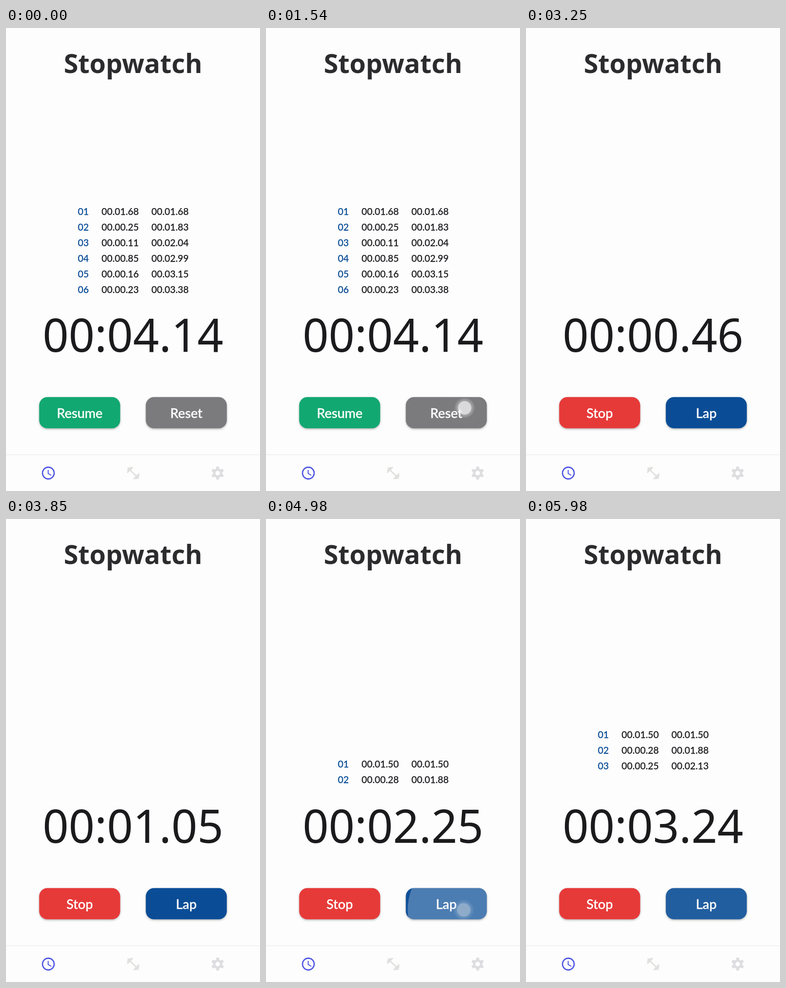
These frames come from a looping animation (555x1008 px, 6 s). An HTML page:

```html
<!DOCTYPE html>
<html lang="en">
<head>
<meta charset="utf-8">
<title>Stopwatch</title>
<style>
  html, body { margin: 0; width: 100%; height: 100%; overflow: hidden; background: #fdfdfd; }
  svg { display: block; width: 100%; height: 100%; }
  text { text-anchor: middle; }
  .title { font: 700 57.3px "Noto Sans", "Open Sans", sans-serif; fill: #2c2c2e; }
  .timer { font: 400 99.6px "Noto Sans", "Open Sans", sans-serif; fill: #1b1b1d; }
  .lap { font: 500 20.6px Lato, sans-serif; fill: #1f1f22; stroke: #1f1f22; stroke-width: .25px; }
  .lap .index { fill: #0a4d96; stroke: #0a4d96; }
  .button rect { filter: drop-shadow(0 2px 2px rgba(0, 0, 0, .28)); }
  .button text { font: 500 28.8px Lato, sans-serif; fill: #fff; stroke: #fff; stroke-width: .4px; }
</style>
</head>
<body>
<svg id="stage" viewBox="0 0 555 1008">
  <defs>
    <radialGradient id="glow">
      <stop offset=".6" stop-color="#fff" stop-opacity=".4"/>
      <stop offset="1" stop-color="#fff" stop-opacity="0"/>
    </radialGradient>
  </defs>
  <text class="title" x="277.5" y="97.5">Stopwatch</text>
  <g id="laps"></g>
  <text id="timer" class="timer" x="277.5" y="705"></text>
  <g id="buttons"></g>
  <g id="ripples" fill="#fff"></g>
  <path d="M0 929H555" stroke="#f1f1f4" stroke-width="2"/>

  <g transform="translate(92.5 969) scale(1.413)">
    <circle r="9" fill="none" stroke="#4f57e3" stroke-width="2"/>
    <path d="M.5-5H-1V1l5.25 3.15 .75-1.23-4.5-2.67z" fill="#4f57e3"/>
  </g>
  <g transform="translate(278 969) scale(1.413) translate(-12 -12)" fill="#dfdfdd">
    <path d="M20.57 14.86 22 13.43 20.57 12 17 15.57 8.43 7 12 3.43 10.57 2 9.14 3.43 7.71 2 5.57 4.14 4.14 2.71
      2.71 4.14 4.14 5.57 2 7.71 3.43 9.14 2 10.57 3.43 12 7 8.43 15.57 17 12 20.57 13.43 22 14.86 20.57 16.29 22
      18.43 19.86 19.86 21.29 21.29 19.86 19.86 18.43 22 16.29z"/>
  </g>
  <g id="gear" transform="translate(462.5 969) scale(1.413)" fill="#dedee1" stroke="#dedee1">
    <circle r="5.4" fill="none" stroke-width="3.7"/>
  </g>

  <g id="touch">
    <circle r="23" fill="url(#glow)"/>
    <circle r="14.5" fill="#ececec" fill-opacity=".7"/>
  </g>
</svg>
<script>
const LOOP = 6000, RESET = 1650, START = 2775;
const LEFT = 72.5, MIDDLE = 189, RIGHT = 305.5;
const ROW = 34, LAST_ROW = 576.8;

const $ = id => document.getElementById(id);
const clamp = v => Math.max(0, Math.min(1, v));
const progress = (t, from, to) => clamp((t - from) / (to - from));
const smooth = p => p * p * (3 - 2 * p);

function add(parent, tag, attrs = {}, content = '') {
  const el = document.createElementNS('http://www.w3.org/2000/svg', tag);
  for (const key in attrs) el.setAttribute(key, attrs[key]);
  el.textContent = content;
  return parent.appendChild(el);
}
const show = (el, on) => el.setAttribute('visibility', on ? 'visible' : 'hidden');

for (let a = 0; a < 360; a += 60)
  add($('gear'), 'path', { d: 'M-1.6-9.6H1.6L2.2-6H-2.2z', 'stroke-width': .8, 'stroke-linejoin': 'round', transform: `rotate(${a})` });

// Buttons per screen
function screen(...buttons) {
  const group = add($('buttons'), 'g');
  for (const [label, x, fill] of buttons) {
    const button = add(group, 'g', { class: 'button' });
    add(button, 'rect', { x, y: 803.5, width: 177, height: 68, rx: 18, fill });
    add(button, 'text', { x: x + 88.5, y: 849 }, label);
  }
  return group;
}
const screens = {
  paused: screen(['Resume', LEFT, '#12a871'], ['Reset', RIGHT, '#7b7a7d']),
  idle: screen(['Start', MIDDLE, '#12a871']),
  running: screen(['Stop', LEFT, '#e63a39'], ['Lap', RIGHT, '#0a4d96']),
};

// Lap rows
function lapRow(lap, total, i) {
  const row = add($('laps'), 'g', { class: 'lap' });
  add(row, 'text', { x: 169, class: 'index' }, '0' + (i + 1));
  add(row, 'text', { x: 249.5 }, '00.' + lap);
  add(row, 'text', { x: 358.5 }, '00.' + total);
  return row;
}
const oldRows = [['01.68', '01.68'], ['00.25', '01.83'], ['00.11', '02.04'],
  ['00.85', '02.99'], ['00.16', '03.15'], ['00.23', '03.38']].map((r, i) => lapRow(...r, i));
oldRows.forEach((row, i) => row.setAttribute('transform', `translate(0 ${LAST_ROW - (5 - i) * ROW})`));
const newRows = [['01.50', '01.50'], ['00.28', '01.88'], ['00.25', '02.13']].map((r, i) => lapRow(...r, i));

// Taps: where, when pressed, when released, on which screen and button
const taps = [
  { x: 434, y: 827, down: 1540, up: RESET, on: 'paused', left: RIGHT },
  { x: 302, y: 851, down: 2660, up: START, on: 'idle', left: MIDDLE },
  { x: 432, y: 843, down: 4160, up: 4275, on: 'running', left: RIGHT },
  { x: 433, y: 845, down: 4530, up: 4635, on: 'running', left: RIGHT },
  { x: 432, y: 851, down: 4770, up: 4870, on: 'running', left: RIGHT },
  { x: 432, y: 850, down: 5600, up: 5707, on: 'running', left: RIGHT },
];
const lapTimes = taps.slice(2).map(tap => tap.up);
for (const tap of taps) {
  const id = 'clip' + tap.down;
  const clip = add($('stage'), 'clipPath', { id });
  add(clip, 'rect', { x: tap.left, y: 803.5, width: 177, height: 68, rx: 18 });
  const group = add($('ripples'), 'g', { 'clip-path': `url(#${id})` });
  tap.ripple = add(group, 'circle', { cx: tap.x, cy: tap.y });
}
// Keep the labels above the ripples
const labels = add($('stage'), 'g');
$('stage').insertBefore(labels, $('touch'));
for (const name in screens) {
  const group = add(labels, 'g', { class: 'button' });
  screens[name].querySelectorAll('text').forEach(text => group.append(text));
  screens[name].labels = group;
}

const clock = [[START, 0], [3850, 1.055], [4580, 1.825], [4980, 2.255], [LOOP, 3.265]];
function elapsed(t) {
  if (t < RESET) return 4.145;
  if (t < START) return 0;
  const i = clock.findIndex(([time]) => t < time);
  const [[t0, v0], [t1, v1]] = clock.slice(i - 1, i + 1);
  return v0 + (v1 - v0) * (t - t0) / (t1 - t0);
}

function draw(t) {
  const current = t < RESET ? 'paused' : t < START ? 'idle' : 'running';
  for (const name in screens) {
    show(screens[name], name === current);
    show(screens[name].labels, name === current);
  }
  $('timer').textContent = '00:' + (Math.floor(elapsed(t) * 100) / 100).toFixed(2).padStart(5, '0');

  oldRows.forEach(row => show(row, current === 'paused'));
  const shifts = lapTimes.map(up => smooth(progress(t, up + 80, up + 310)));
  newRows.forEach((row, i) => {
    const lift = shifts.slice(i + 1).reduce((sum, s) => sum + s, 0);
    const delay = i ? 290 : 90;
    row.setAttribute('transform', `translate(0 ${LAST_ROW - lift * ROW})`);
    row.setAttribute('opacity', progress(t, lapTimes[i] + delay, lapTimes[i] + delay + 40));
  });

  for (const { ripple, down, up, on } of taps) {
    const age = t - down;
    const alpha = .25 * clamp(age / 90) * (1 - progress(t, up + 120, up + 370));
    ripple.setAttribute('r', Math.max(0, 38 + .4 * age));
    ripple.setAttribute('opacity', on === current ? alpha : 0);
  }

  const tap = taps.find(({ down, up }) => t >= down && t < up + 180);
  show($('touch'), tap);
  if (tap) {
    $('touch').setAttribute('transform', `translate(${tap.x} ${tap.y})`);
    $('touch').setAttribute('opacity', 1 - progress(t, tap.up + 40, tap.up + 180));
  }
}

function tick() {
  draw(performance.now() % LOOP);
  requestAnimationFrame(tick);
}
tick();
</script>
</body>
</html>
```
